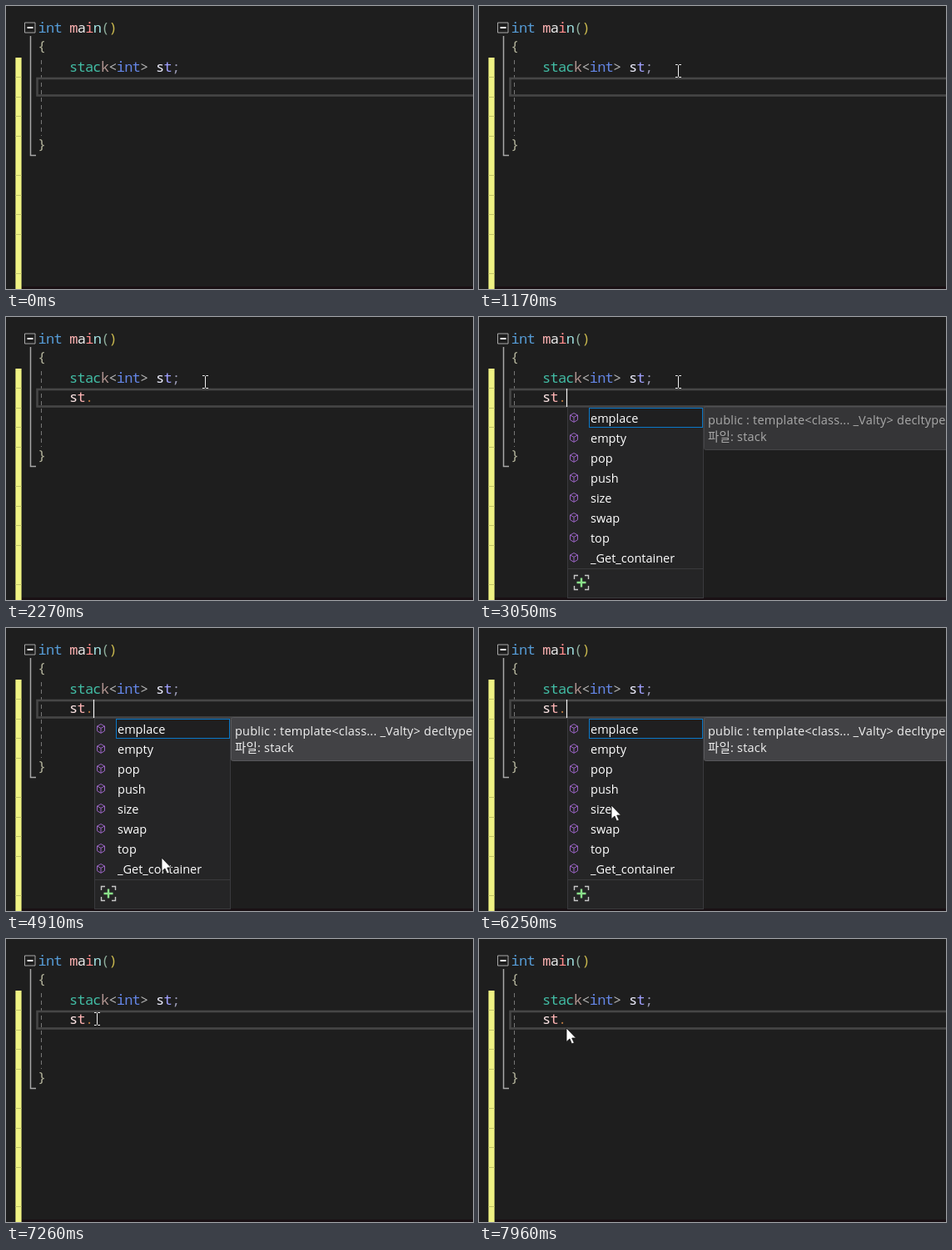
An HTML page for the animation above (8 s loop, 561 by 340 pixels).

```html
<!DOCTYPE html>
<html lang="ko">
<head>
<meta charset="utf-8">
<style>
html, body { margin: 0; width: 100%; height: 100%; overflow: hidden; background: #1e1e1e; }
svg { display: block; }
text { white-space: pre; }
.code { font: 200 17px "Noto Sans Mono", "DejaVu Sans Mono", monospace; letter-spacing: -.75px; }
.ui { font: 14.5px "Open Sans", "Noto Sans CJK KR", "Noto Sans", sans-serif; fill: #fff; }
.tip .ui { fill: #f1f1f1; letter-spacing: .2px; }
</style>
</head>
<body>
<svg id="stage" width="561" height="340" viewBox="0 0 561 340">
  <defs>
    <g id="cube" fill="none" stroke="#9a64c4">
      <path d="M0-5.5 4.5-3V2.7L0 5.3-4.5 2.7V-3ZM-4.5-3 0-.6 4.5-3M0-.6V5.3"/>
    </g>
  </defs>
  <path d="M19 338.5H561" stroke="#191014" stroke-width="3"/>
  <path d="M11.4 62H18.6V340H11.4Z" fill="#eff284"/>
  <path d="M11.4 85.5h7.2m-7.2 24h7.2m-7.2 23h7.2m-7.2 24h7.2m-7.2 47h7.2m-7.2 24h7.2m-7.2 23h7.2m-7.2 24h7.2m-7.2 47h7.2" stroke="#c2c46a"/>
  <g fill="none" stroke="#a8a8a8">
    <path d="M22.5 20H35V32H22.5Z"/>
    <path d="M29.5 36V179.5H36" stroke-width="1.5"/>
    <path d="M25.5 26H32.5" stroke="#f0f0f0" stroke-width="2"/>
    <path d="M42.5 65V156" stroke="#777" stroke-dasharray="5 4"/>
  </g>
  <rect id="line" x="37.5" y="87" width="540" height="20.5" fill="none" stroke="#464646" stroke-width="2.6"/>
  <rect id="mark" y="85" height="24" fill="#264f78"/>
  <g id="text"></g>
  <path id="caret" d="M0 86V108" stroke="#f4f4f4" stroke-width="1.2"/>
  <g id="popups"></g>
  <path id="beam" d="M-3.5-7.5H-1L0-6.5 1-7.5H3.5M0-6.5V6.5M-3.5 7.5H-1L0 6.5 1 7.5H3.5" transform="translate(0 0)" fill="none" stroke="#f2f2f2"/>
  <path id="arrow" d="M0 0V16.5L3.9 13 6.5 19 9.3 17.8 6.7 12H11.5Z" fill="#fff" stroke="#111" stroke-width=".8"/>
</svg>
<script>
const $ = id => document.getElementById(id);
const LOOP = 8000, STEP = 76, LEFT = 76, PITCH = 9.45;

// Each run is a pair: characters and their colour
function code(x, y, ...runs) {
  let spans = "";
  for (let i = 0; i < runs.length; i += 2) {
    const chars = runs[i].replace(/</g, "&lt;");
    spans += `<tspan fill="${runs[i + 1]}">${chars}</tspan>`;
  }
  return `<text class="code" x="${x}" y="${y}">${spans}</text>`;
}

$("text").innerHTML =
  code(38.5, 32, "int", "#569cd6", " m", "#ffb4b4", "a", "#eeeeee", "i", "#ff8c8c", "n", "#a4e4e4", "(", "#8fae9c", ")", "#c9b84e") +
  code(38, 54, "{", "#b4b49c") +
  code(LEFT, 79, "stac", "#42bda5", "k", "#b09490", "<", "#b4b4b4", "int", "#6486e6", ">", "#b4b4b4", " s", "#f0f0ff", "t", "#a0a0ff", ";", "#9a9ab4") +
  code(38, 171.5, "}", "#b4b49c") +
  `<g id="typed">${code(LEFT, 102, "s", "#ffe8e8", "t", "#ffb4b4", ".", "#b87840")}</g>`;
const typed = [...$("typed").querySelectorAll("tspan")];

function list(id, x, items) {
  const rows = items.map((name, i) =>
    `<use href="#cube" x="8" y="${13 + 24 * i}"/><text class="ui" x="28" y="${18.5 + 24 * i}">${name}</text>`);
  return `<g id="${id}" transform="translate(${x} 108)">
    <rect x=".5" y=".5" width="163" height="229" fill="#252526" stroke="#3a3a3d"/>
    <rect x="26.5" y="1.5" width="136" height="23" fill="#1f1f20" stroke="#0a78c8"/>
    ${rows.join("")}
    <path d="M1 194.5H163" stroke="#3a3a3d"/>
    <path d="M8.5 207V202.5H13M21 202.5H25.5V207M25.5 215V219.5H21M13 219.5H8.5V215" fill="none" stroke="#c8c8c8" stroke-width="1.4"/>
    <path d="M11.5 211H22.5M17 205.5V216.5" stroke="#8ae08a" stroke-width="2.4"/>
  </g>`;
}

function tip(id, x, ...lines) {
  const rows = lines.map((s, i) => `<text class="ui" x="5" y="${22 + 20 * i}">${s}</text>`);
  return `<g id="${id}" class="tip" transform="translate(${x} 107)">
    <rect x=".5" y=".5" width="520" height="52" rx="2" fill="#424245" stroke="#58585b"/>${rows.join("")}</g>`;
}

$("popups").innerHTML =
  tip("wordTip", 241, "(지역 변수) stack&lt;int> st", "파일: main") +
  list("words", 77, ["st", "stack", "static", "static_assert", "static_cast", "string", "struct", "switch"]) +
  tip("memberTip", 270, "public : template&lt;class... _Valty> decltype(auto)", "파일: stack") +
  list("members", 106, ["emplace", "empty", "pop", "push", "size", "swap", "top", "_Get_container"]);

// Pointer moves: start, steps, end x, end y
const moves = [
  [70, 11, 202, 90], [940, 4, 239, 78], [3126, 5, 187, 276],
  [6160, 6, 103, 87], [6620, 1, 115, 95], [7260, 6, 76, 101], [7960, 1, 105, 107]
];

// Visible caret: from, until, column
const blinks = [
  [620, 1170, 0], [1720, 1870, 0], [1870, 2030, 1], [2030, 2270, 2],
  [2800, 3350, 3], [3890, 4360, 3], [4910, 5460, 3], [6010, 6560, 3],
  [6940, 7020, 3], [7090, 7260, 3]
];

const show = (id, on) => $(id).style.display = on ? "" : "none";

function pointer(t) {
  let x = 145, y = 230;
  for (const [start, n, toX, toY] of moves) {
    const k = Math.max(0, Math.min(n, Math.floor((t - start) / STEP) + 1)) / n;
    x += (toX - x) * k;
    y += (toY - y) * k;
  }
  return [x, y];
}

function draw(t) {
  const within = (from, to) => t >= from && t < to;

  const count = [1870, 2030, 2270].filter(at => t >= at).length;
  typed.forEach((span, i) => span.style.visibility = i < count ? "visible" : "hidden");

  const blink = blinks.find(([from, to]) => within(from, to));
  show("caret", blink);
  if (blink) $("caret").setAttribute("transform", `translate(${Math.round(LEFT + blink[2] * PITCH) + 1.5})`);

  show("words", within(2100, 2270));
  show("wordTip", within(2100, 2270));
  show("members", within(2420, 7020));
  show("memberTip", within(3050, 7090));
  $("memberTip").style.opacity = t < 3050 + STEP ? .66 : 1;

  const [x, y] = pointer(t);
  const overList = y >= 108 && within(3126, 7020);
  const isArrow = overList || t >= 7960;
  show("arrow", isArrow);
  show("beam", !isArrow && t >= 70);
  const half = isArrow ? 0 : .5;
  $(isArrow ? "arrow" : "beam").setAttribute("transform", `translate(${Math.round(x) + half} ${Math.round(y)})`);

  // Dragging left selects whole characters back from the dot
  const column = t < 7260 ? 3 : Math.max(0, Math.min(3, Math.round((x - LEFT) / PITCH)));
  const from = 76 + column * 9.667;
  $("mark").setAttribute("x", from);
  $("mark").setAttribute("width", 105 - from);
  show("line", column === 3);
}

function tick(now) {
  draw(now % LOOP);
  requestAnimationFrame(tick);
}
draw(0);
requestAnimationFrame(tick);
</script>
</body>
</html>
```
